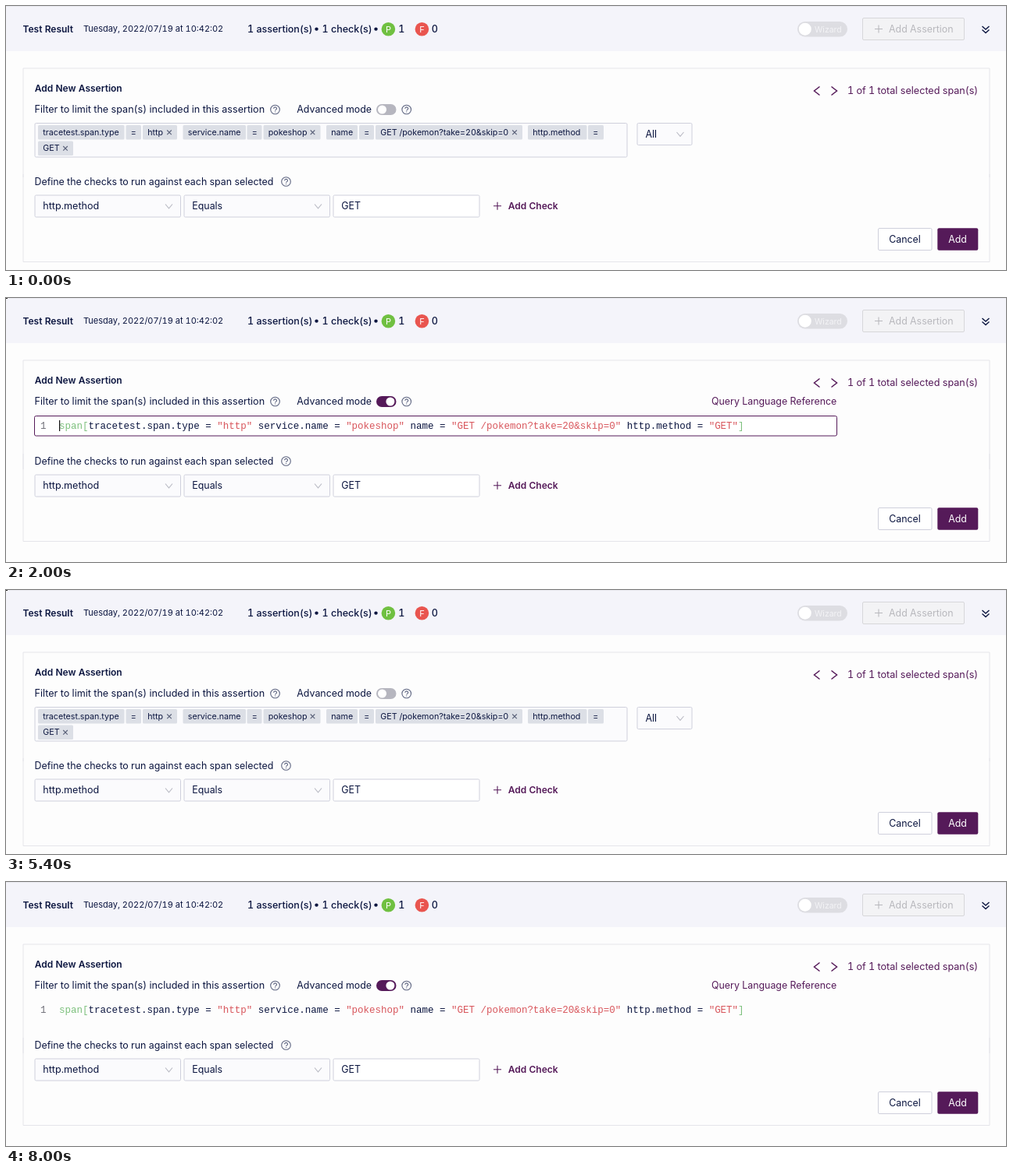
An HTML page that plays this animation: 1280x339 px, repeating every 8.2 s.

```html
<!DOCTYPE html>
<html lang="en">
<head>
<meta charset="utf-8">
<title>Add New Assertion</title>
<style>
  html, body { margin: 0; width: 100%; height: 100%; overflow: hidden; background: #fdfdfd; }
  svg { display: block; width: 100vw; height: 100vh; }
  text { font: 12.4px Inter, "Open Sans", sans-serif; font-feature-settings: "tnum"; fill: #0c1640; }
  .bold { font-weight: 600; font-size: 12px; }
  .mid { font-weight: 500; font-size: 12.5px; }
  .wide { font-size: 12.6px; }
  .date { font-size: 11px; }
  .plum { fill: #551a59; }
  .white { fill: #fff; }
  .tag text { font-size: 10.7px; }
  .tag rect { fill: #dcdfe6; }
  .code text { font: 12.49px "Liberation Mono", "Courier New", monospace; }
  .key { fill: #7cc07c; }
  .str { fill: #d8565c; }
  .line { fill: none; stroke-width: 1.1; }
  .field { fill: #fbfbfd; stroke: #cfd0dc; }
  .input { fill: #fff; stroke: #cfd0dc; }
  .card { fill: none; stroke: #e5e5ea; }

  .wizard, .advanced, .focus, .caret, .speck, .glow, .lower {
    animation: 8.2s step-end infinite;
  }
  .wizard { animation-name: wizard; }
  .advanced { animation-name: advanced; }
  .lower { animation-name: lower; }
  .focus { animation-name: focus; }
  .caret { animation-name: caret; }
  .speck { animation-name: speck; }
  .glow { animation-name: glow; }
  @keyframes wizard { 0%, 38.9% { opacity: 1 } 7.2%, 68.2%, 100% { opacity: 0 } }
  @keyframes advanced { 0%, 38.9% { opacity: 0 } 7.2%, 68.2%, 100% { opacity: 1 } }
  @keyframes lower {
    0%, 38.9% { transform: translateY(16px) }
    7.2%, 68.2%, 100% { transform: none }
  }
  @keyframes focus { 0%, 34.1%, 95.1%, 100% { opacity: 0 } 7.2%, 68.2% { opacity: 1 } }
  @keyframes caret {
    0%, 14.6%, 29.2%, 75.6%, 90.2%, 100% { opacity: 0 }
    7.2%, 21.9%, 68.2%, 82.9% { opacity: 1 }
  }
  @keyframes speck { 0%, 75.6%, 100% { opacity: 0 } 17% { opacity: 1 } }
  @keyframes glow { 0%, 14.6%, 100% { opacity: 0 } 7.2% { opacity: 1 } }
</style>
</head>
<body>
<svg viewBox="0 0 1280 339" preserveAspectRatio="none">
  <defs>
    <g id="help">
      <circle r="5.8" class="line" stroke="#5d6480"/>
      <path d="M-1.9 -1.3C-1.9 -3.8 2 -3.8 2 -1.3C2 0.2 0 0 0 1.6M0 2.5V3.6" class="line" stroke="#5d6480"/>
    </g>
    <path id="arrow" d="M-4.5 -2.5L0 2.8L4.5 -2.5" class="line" stroke="#b9bac4"/>
    <path id="plus" d="M-5 0H5M0 -5V5" class="line"/>
  </defs>

  <rect width="1280" height="339" fill="#fdfdfd"/>
  <rect width="1280" height="58" fill="#f4f4fa"/>
  <rect width="1280" height="1" fill="#e9e9ee"/>
  <rect class="speck" width="2" height="1" fill="#222"/>

  <text x="21.5" y="33.6" class="bold">Test Result</text>
  <text x="99" y="33.4" class="date">Tuesday, 2022/07/19 at 10:42:02</text>
  <text x="309" y="33.6" class="mid">1 assertion(s)</text>
  <text x="404.5" y="33.6" class="mid">1 check(s)</text>
  <circle cx="397.5" cy="29.6" r="2.2" fill="#0c1640"/>
  <circle cx="473.5" cy="29.6" r="2.2" fill="#0c1640"/>
  <circle cx="489.4" cy="29.7" r="8.8" fill="#70c041"/>
  <text x="489.4" y="33.5" text-anchor="middle" class="white date">P</text>
  <text x="502.3" y="33.6" class="mid">1</text>
  <circle cx="532.4" cy="29.7" r="8.8" fill="#e9554f"/>
  <text x="532.4" y="33.5" text-anchor="middle" class="white date">F</text>
  <text x="544.8" y="33.6" class="mid">0</text>

  <rect x="1013" y="20" width="64" height="19.5" rx="9.75" fill="#dddde2"/>
  <circle cx="1022.8" cy="29.7" r="8" class="white"/>
  <text x="1035" y="33.6" style="font-size:10.5px;fill:#f3f3f6">Wizard</text>
  <rect x="1096.5" y="15.5" width="130" height="28" rx="1.5" fill="#f3f3f5" stroke="#d7d7da"/>
  <use href="#plus" x="1117" y="29.5" stroke="#b8b8bd"/>
  <text x="1130" y="33.8" style="fill:#b8b8bd">Add Assertion</text>
  <path d="M1249.5 26L1254 30L1258.5 26M1249.5 30.5L1254 34.5L1258.5 30.5" class="line" stroke="#0c1640" style="stroke-width:1.4"/>

  <path d="M22 220V80H1259V220" class="card"/>
  <text x="36.7" y="109.6" class="bold">Add New Assertion</text>
  <path d="M1041.5 103.5L1034.5 109L1041.5 114.5M1056.5 103.5L1063.5 109L1056.5 114.5" class="line" stroke="#551a59" style="stroke-width:1.5"/>
  <text x="1244.3" y="113.4" text-anchor="end" class="plum wide">1 of 1 total selected span(s)</text>
  <text x="36.5" y="137.3" class="wide">Filter to limit the span(s) included in this assertion</text>
  <use href="#help" x="344.5" y="133"/>
  <text x="372.3" y="137.3">Advanced mode</text>
  <use href="#help" x="512.7" y="133"/>

  <g class="wizard">
    <rect x="474" y="126" width="25.5" height="14" rx="7" fill="#b6b6bf"/>
    <circle cx="481.5" cy="133" r="5.5" class="white"/>
    <rect x="37" y="150.5" width="758" height="43.5" rx="1.5" class="field"/>
    <g class="tag" id="tags"></g>
    <rect x="808" y="150.5" width="70" height="28" rx="1.5" class="field"/>
    <text x="818.5" y="168.6">All</text>
    <use href="#arrow" x="863" y="164.5"/>
  </g>

  <g class="advanced">
    <rect class="glow" x="472" y="124" width="29.5" height="18" rx="9" fill="#e6dfe8"/>
    <rect x="474" y="126" width="25.5" height="14" rx="7" class="plum"/>
    <circle cx="491.9" cy="133" r="5.5" class="white"/>
    <text x="903" y="137.3" class="plum">Query Language Reference</text>
    <rect x="36.5" y="151.5" width="1027" height="25.5" rx="2" class="focus" fill="#fff" stroke="#551a59"/>
    <g class="code">
      <text x="44" y="167.6" style="fill:#6f6f78">1</text>
      <text x="68" y="167.6"><tspan class="key">span[</tspan>tracetest.span.type = <tspan class="str">"http"</tspan> service.name = <tspan class="str">"pokeshop"</tspan> name = <tspan class="str">"GET /pokemon?take=20&amp;skip=0"</tspan> http.method = <tspan class="str">"GET"</tspan><tspan class="key">]</tspan></text>
    </g>
    <rect class="caret" x="68" y="157" width="1.2" height="14" fill="#111"/>
  </g>

  <g class="lower">
    <path d="M22 200V312.5H1259V200" class="card"/>
    <text x="36.5" y="214.2">Define the checks to run against each span selected</text>
    <use href="#help" x="358.5" y="209.5"/>
    <rect x="37" y="227" width="186.5" height="28" rx="1.5" class="field"/>
    <rect x="228" y="227" width="186.5" height="28" rx="1.5" class="field"/>
    <rect x="419" y="227" width="187" height="28" rx="1.5" class="input"/>
    <text x="47.3" y="245.4" class="wide">http.method</text>
    <text x="238.3" y="245.4">Equals</text>
    <text x="429.3" y="245.4">GET</text>
    <use href="#arrow" x="208.5" y="241"/>
    <use href="#arrow" x="399.5" y="241"/>
    <use href="#plus" x="629" y="240.8" stroke="#551a59"/>
    <text x="642.7" y="245.4" class="bold plum">Add Check</text>
    <rect x="1116.5" y="269.5" width="68.5" height="28" rx="1.5" class="input"/>
    <text x="1150.5" y="288" text-anchor="middle">Cancel</text>
    <rect x="1192.3" y="269.3" width="52" height="28.4" rx="2" class="plum"/>
    <text x="1218" y="288" text-anchor="middle" class="white">Add</text>
  </g>
</svg>
<script>
  const tags = document.getElementById('tags');
  const tag = (label, x, w, y = 153, closable = false) => {
    const cx = x + w - 10, cy = y + 9.3;
    const cross = closable
      ? `<path d="M${cx - 2.8} ${cy - 2.8}l5.6 5.6m0 -5.6l-5.6 5.6" class="line" stroke="#596078"/>` : '';
    tags.innerHTML += `<rect x="${x}" y="${y}" width="${w}" height="18.5" rx="1.5"/>` +
      `<text x="${x + 6.3}" y="${y + 12.9}">${label}</text>${cross}`;
  };
  tag('tracetest.span.type', 41, 110.5);
  tag('=', 153.5, 19.5);
  tag('http', 175, 44, 153, true);
  tag('service.name', 226.5, 80.5);
  tag('=', 308.5, 19);
  tag('pokeshop', 329.5, 73, 153, true);
  tag('name', 410, 40);
  tag('=', 452, 19);
  tag('GET /pokemon?take=20&amp;skip=0', 473, 188, 153, true);
  tag('http.method', 668, 75.5);
  tag('=', 745, 20);
  tag('GET', 41, 45, 173.5, true);
</script>
</body>
</html>
```
